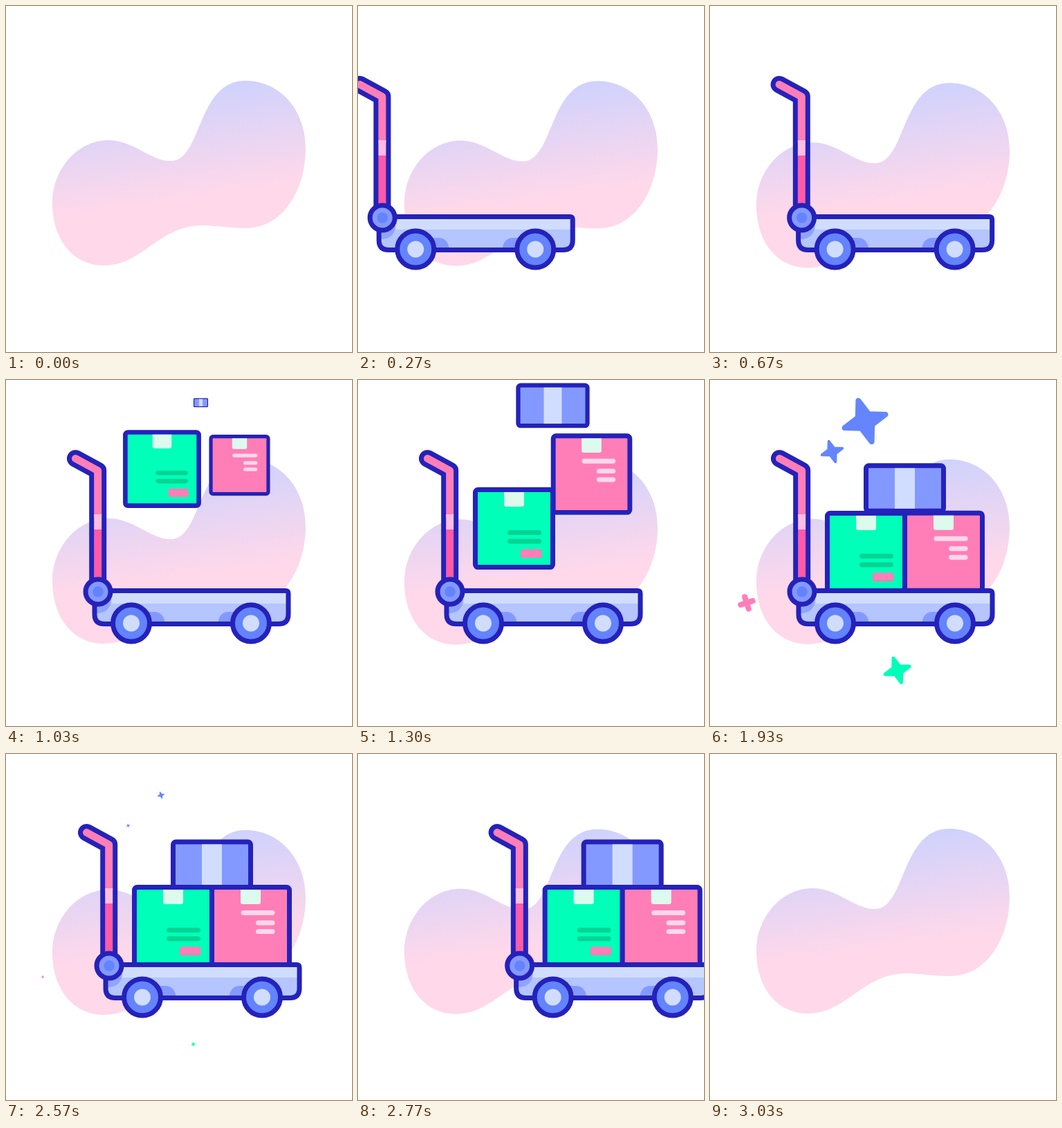
Write an HTML page that moves like this. It is 500 px wide and 500 px high and loops after 3060 ms.

```html
<!DOCTYPE html>
<html lang="en">
<head>
<meta charset="utf-8">
<title>Loading cart</title>
<style>
  html, body { margin: 0; width: 100%; height: 100%; overflow: hidden; background: #fff; }
  svg { display: block; width: 100%; height: 100%; }
  .outline { stroke: #2422ba; stroke-width: 7; stroke-linejoin: round; }
  .handle { fill: none; stroke-linejoin: round; }
  .star { stroke-width: 8; stroke-linejoin: round; stroke-linecap: round; }
</style>
</head>
<body>
<svg viewBox="0 0 500 500">
  <defs>
    <linearGradient id="sky" gradientUnits="userSpaceOnUse" x1="340" y1="108" x2="362" y2="263">
      <stop offset="0" stop-color="#cfd2fd"/>
      <stop offset="1" stop-color="#ffd8ea"/>
    </linearGradient>
    <clipPath id="bed"><rect x="128" y="304.5" width="280" height="48"/></clipPath>
    <path id="sparkle" d="M31 0L8.1 8.1L0 31L-8.1 8.1L-31 0L-8.1 -8.1L0 -31L8.1 -8.1Z"/>
    <g id="wheel">
      <circle class="outline" r="26.5" fill="#6383ff"/>
      <circle r="12" fill="#d1ddff"/>
    </g>
  </defs>

  <path id="blob" fill="url(#sky)" d="M148 194C185 194 208 224 238 224C284 224 275 108 346 108C396 108 433 150 433 206C433 262 403 321 346 321C322 321 304 317 284 317C221 317 197 375 142 375C95 375 67 335 67 285C67 235 104 194 148 194Z"/>

  <g id="stars"></g>

  <g id="cart">
    <g id="green">
      <rect class="outline" x="169.5" y="192.5" width="112" height="112" rx="4" fill="#00ffb8"/>
      <path d="M211 196H240V214Q240 217 237 217H214Q211 217 211 214Z" fill="#dcfbed"/>
      <g fill="#00d594">
        <rect x="216" y="251" width="49" height="7" rx="3.5"/>
        <rect x="216" y="263.5" width="49" height="7" rx="3.5"/>
      </g>
      <rect x="235" y="278.5" width="30.5" height="12.5" rx="3" fill="#ff7eb7"/>
    </g>
    <g id="pink">
      <rect class="outline" x="281.5" y="192.5" width="112" height="112" rx="4" fill="#ff7eb7"/>
      <path d="M323 196H352V214Q352 217 349 217H326Q323 217 323 214Z" fill="#dcfbed"/>
      <g fill="#ffd8ea">
        <rect x="323.5" y="226" width="49" height="7" rx="3.5"/>
        <rect x="345" y="240.5" width="27.5" height="7" rx="3.5"/>
        <rect x="345" y="253" width="27.5" height="7" rx="3.5"/>
      </g>
    </g>
    <g id="blue">
      <rect class="outline" x="225.5" y="127" width="112" height="65.5" rx="4" fill="#8499ff"/>
      <rect x="267" y="130.5" width="29" height="58.5" fill="#d1ddff"/>
    </g>

    <path d="M128 304.5H404Q408 304.5 408 308.5V338.500Q408 352.5 394 352.5H142Q128 352.5 128 338.5Z" fill="#b4c5ff"/>
    <path d="M128 304.5H404Q408 304.5 408 308.5V323H128Z" fill="#d1ddff"/>
    <g fill="#8499ff" clip-path="url(#bed)">
      <circle cx="133" cy="318" r="19" opacity=".75"/>
      <path d="M181 335H214Q228 335 230 353H181Z"/>
      <path d="M354 335H322Q308 335 306 353H354Z"/>
    </g>
    <path class="outline" fill="none" d="M128 304.5H404Q408 304.5 408 308.5V338.500Q408 352.5 394 352.5H142Q128 352.5 128 338.5Z"/>

    <g class="handle">
      <path d="M132.700 306V131L100.500 113.500" stroke="#2422ba" stroke-width="25" stroke-linecap="round"/>
      <path d="M132.700 196V131L100.500 113.500" stroke="#ff7eb7" stroke-width="11" stroke-linecap="round"/>
      <path d="M132.700 194V216" stroke="#ffbde0" stroke-width="11"/>
      <path d="M132.700 216V306" stroke="#ff5aa8" stroke-width="11"/>
    </g>
    <circle class="outline" cx="133" cy="306" r="18" fill="#8499ff"/>
    <circle cx="133" cy="306" r="7.700" fill="#6383ff"/>
    <use href="#wheel" x="181" y="351.500"/>
    <use href="#wheel" x="354" y="351.500"/>
  </g>
</svg>
<script>
const LOOP = 3060, FRAME = 100 / 3;
const TRAVEL = 420, DROP = 127;

const byId = id => document.getElementById(id);
const progress = (t, start, length) => Math.min(1, Math.max(0, (t - start) / length));
const easeOut = (p, power) => 1 - (1 - p) ** power;

// Cubic Bezier easing through (a, 0) and (b, 1), solved by bisection
function bezier(p, a, b) {
  let low = 0, high = 1;
  for (let i = 0; i < 24; i++) {
    const s = (low + high) / 2;
    const x = 3 * a * s * (1 - s) ** 2 + 3 * b * s * s * (1 - s) + s ** 3;
    if (x < p) low = s; else high = s;
  }
  return low * low * (3 - 2 * low);
}

const boxes = [
  { id: 'green', cx: 225.5, cy: 248.5, start: 667 },
  { id: 'pink', cx: 337.5, cy: 248.5, start: 833 },
  { id: 'blue', cx: 281.5, cy: 159.75, start: 1000 }
].map(box => ({ ...box, el: byId(box.id) }));

const stars = [
  { x: 224, y: 59.5, size: 1, color: '#6485ff' },
  { x: 176.5, y: 103.5, size: .5, color: '#6485ff' },
  { x: 270.7, y: 419.5, size: .6, color: '#00ffb8' },
  { x: 53, y: 322, size: 1, color: '#ff7eb7', plus: true }
].map(star => {
  const el = document.createElementNS('http://www.w3.org/2000/svg', 'g');
  el.setAttribute('class', 'star');
  el.setAttribute('fill', star.color);
  el.setAttribute('stroke', star.color);
  el.innerHTML = star.plus ? '<path d="M-9.2 0H9.2M0 -9.2V9.2"/>' : '<use href="#sparkle"/>';
  byId('stars').append(el);
  return { ...star, el };
});

const blob = byId('blob'), cart = byId('cart');

function place(el, transform, visible = true) {
  el.setAttribute('transform', transform);
  el.setAttribute('visibility', visible ? 'visible' : 'hidden');
}

function draw(t) {
  place(blob, `translate(0 ${4 * (1 - Math.cos(2 * Math.PI * t / LOOP))})`);

  const arrive = easeOut(progress(t, 33, 765), 4) - 1;
  const leave = progress(t, 2330, 703) ** 3;
  place(cart, `translate(${TRAVEL * (arrive + leave)} 0)`);

  for (const { el, cx, cy, start } of boxes) {
    const scale = easeOut(progress(t, start, 700), 4);
    const lift = DROP * (1 - bezier(progress(t, start, 1200), .95, .05));
    place(el, `translate(${cx} ${cy - lift}) scale(${scale}) translate(${-cx} ${-cy})`, scale > 0);
  }

  const grow = easeOut(progress(t, 1300, 700), 3);
  const shrink = progress(t, 2000, 615) ** 2;
  const twinkle = grow - shrink;
  for (const { el, x, y, size } of stars) {
    place(el, `translate(${x} ${y}) rotate(-18) scale(${size * twinkle})`, twinkle > 0.001);
  }
}

let origin;
function tick(now) {
  origin ??= now;
  const t = (now - origin) % LOOP;
  // The motion steps at 30 pictures per second
  draw(Math.floor((t + 4) / FRAME) * FRAME);
  requestAnimationFrame(tick);
}
draw(0);
requestAnimationFrame(tick);
</script>
</body>
</html>
```
